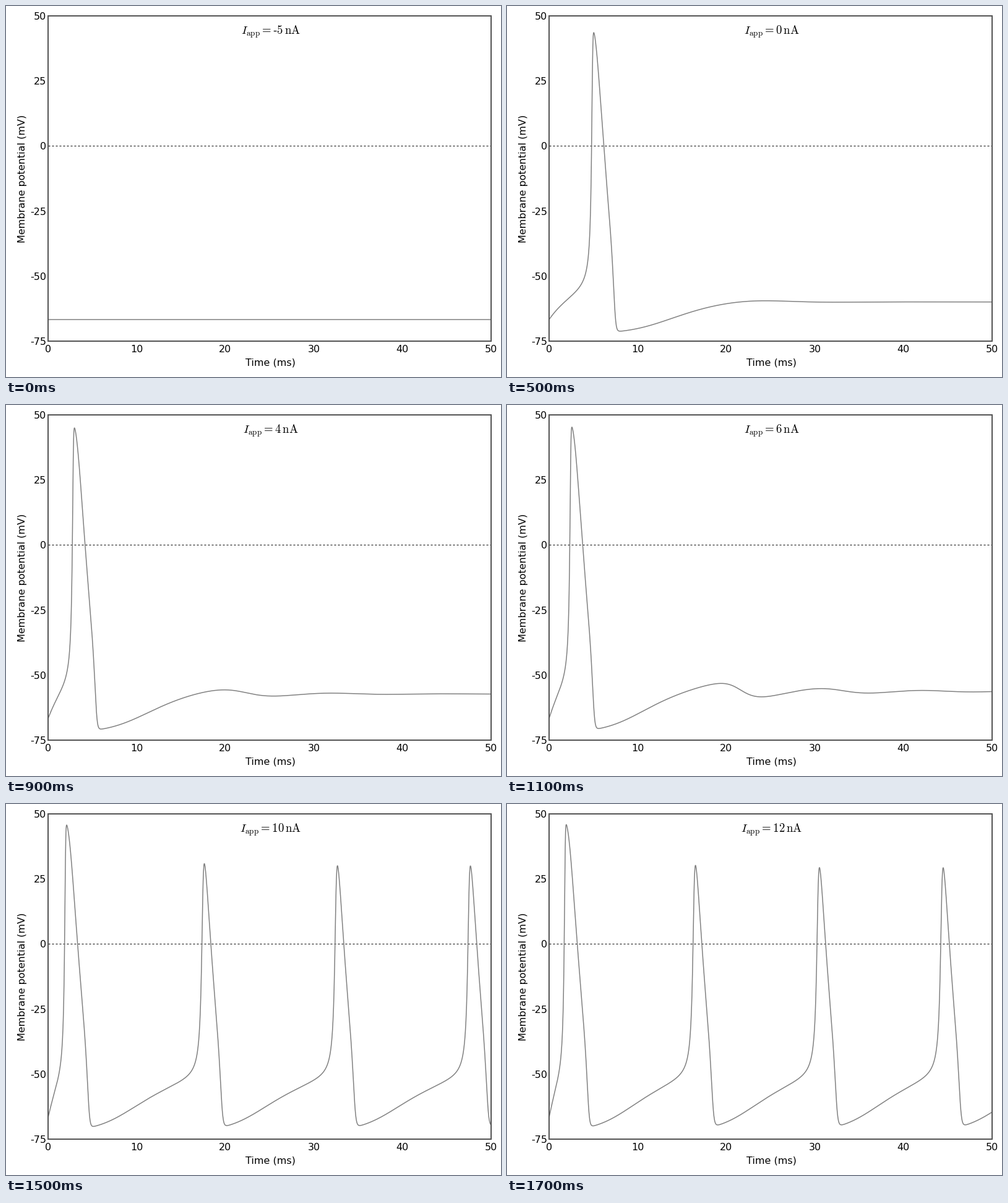
A matplotlib script that plays this animation: 800x600 px, repeating every 1.8 s.

```python
import numpy as np
import matplotlib.pyplot as plt
from matplotlib.animation import FuncAnimation

W, H, DPI = 800, 600, 100
LEFT, RIGHT, TOP, BOTTOM = 68, 784, 16, 542
T_MAX, DT = 50, 0.02
V_MIN, V_MAX = -75, 50
CURRENTS = np.arange(-5, 13)

plt.rcParams["font.family"] = "DejaVu Sans"
plt.rcParams["mathtext.fontset"] = "cm"


def px(n):
    """Pixels to points."""
    return n * 72 / DPI


# Hodgkin-Huxley membrane
G_NA, G_K, G_L = 120, 36, 0.3
E_NA, E_K, E_L = 50, -72, -49


def rates(v):
    """Opening and closing rates of the gates m, h, n."""
    u = v + 60
    opening = np.array([
        0.1 * (u - 25) / (1 - np.exp((25 - u) / 10)),
        0.07 * np.exp(-u / 20),
        0.01 * (u - 10) / (1 - np.exp((10 - u) / 10)),
    ])
    closing = np.array([
        4 * np.exp(-u / 18),
        1 / (np.exp((30 - u) / 10) + 1),
        0.125 * np.exp(-u / 80),
    ])
    return opening, closing


def ionic(v, gates):
    m, h, n = gates
    return (G_NA * m**3 * h * (v - E_NA)
            + G_K * n**4 * (v - E_K)
            + G_L * (v - E_L))


def steady_gates(v):
    a, b = rates(v)
    return a / (a + b)


def slope(state):
    v, gates = state[0], state[1:]
    a, b = rates(v)
    return np.vstack([CURRENTS - ionic(v, gates), a * (1 - gates) - b * gates])


def simulate():
    """Voltage over time for every current, from rest at the first current."""
    grid = np.linspace(-74.9, -60.1, 4000)
    v0 = np.interp(CURRENTS[0], ionic(grid, steady_gates(grid)), grid)
    start = np.array([v0, *steady_gates(v0)])
    state = np.repeat(start[:, None], len(CURRENTS), axis=1)
    volts = [state[0]]
    for _ in range(round(T_MAX / DT)):
        k1 = slope(state)
        k2 = slope(state + DT / 2 * k1)
        k3 = slope(state + DT / 2 * k2)
        k4 = slope(state + DT * k3)
        state = state + DT / 6 * (k1 + 2 * k2 + 2 * k3 + k4)
        volts.append(state[0])
    return np.array(volts).T


volts = simulate()
times = np.linspace(0, T_MAX, volts.shape[1])

fig = plt.figure(figsize=(W / DPI, H / DPI), dpi=DPI, facecolor="white")
ax = fig.add_axes([LEFT / W, 1 - BOTTOM / H,
                   (RIGHT - LEFT) / W, (BOTTOM - TOP) / H])
ax.set(xlim=(0, T_MAX), ylim=(V_MIN, V_MAX), xticks=[], yticks=[])
for spine in ax.spines.values():
    spine.set(linewidth=px(2), color="0.33")


def label(x, y, text, size=16, **kw):
    """Text with its baseline at a pixel position from the top left."""
    style = dict(ha="center", va="baseline", fontsize=px(size)) | kw
    return fig.text(x / W, 1 - y / H, text, **style)


for t in range(0, T_MAX + 1, 10):
    label(LEFT + t / T_MAX * (RIGHT - LEFT), 560, str(t))
for v in range(V_MIN, V_MAX + 1, 25):
    y = BOTTOM - (v - V_MIN) / (V_MAX - V_MIN) * (BOTTOM - TOP)
    label(65, y + 6, str(v), ha="right")
label(427.5, 581, "Time (ms)")
label(31, 279, "Membrane potential (mV)", rotation=90, rotation_mode="anchor")

ax.axhline(0, color="black", lw=px(1), ls=(0, (3, 3)))
curve, = ax.plot([], [], color="0.5", lw=px(1.5), snap=False)
title = label(427.5, 45.5, "", size=18.75)


def draw(i):
    curve.set_data(times, volts[i])
    amps = str(CURRENTS[i]).replace("-", "\u2010")  # short hyphen, not a minus
    title.set_text(rf"$I_{{\mathrm{{app}}}}=\mathrm{{{amps}}}\,\mathrm{{nA}}$")
    return curve, title


anim = FuncAnimation(fig, draw, frames=len(CURRENTS), interval=100,
                     repeat=True, repeat_delay=0)
plt.show()
```
